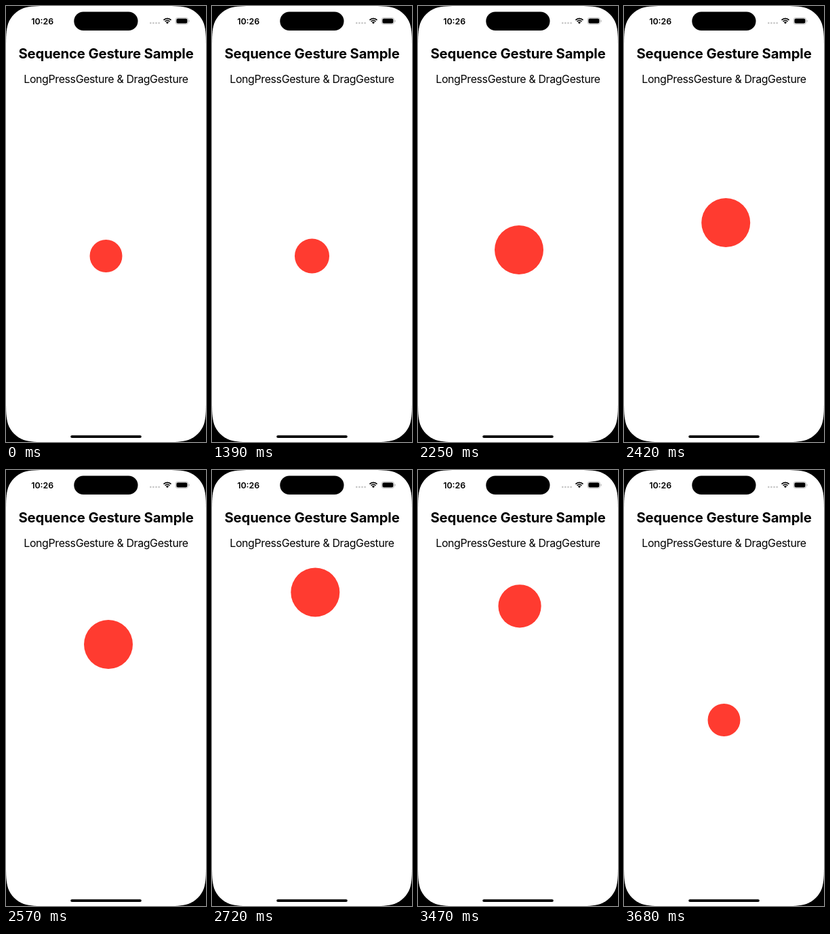
An HTML page with a canvas that plays this animation: 295x640 px, repeating every 3.7 s.

```html
<!DOCTYPE html>
<html lang="en">
<head>
<meta charset="utf-8">
<title>Sequence Gesture Sample</title>
<style>
html, body { margin: 0; width: 100%; height: 100%; overflow: hidden; background: #000; }
canvas { display: block; width: 295px; height: 640px; }
</style>
</head>
<body>
<canvas id="stage"></canvas>
<script>
const W = 295, H = 640, LOOP = 3700;
const FONT = 'Inter, Roboto, "Liberation Sans", sans-serif';
const canvas = document.getElementById('stage');
const ctx = canvas.getContext('2d');
const dpr = window.devicePixelRatio || 1;
canvas.width = W * dpr;
canvas.height = H * dpr;

const REST = { x: 147.5, y: 367, r: 24 };
const HELD_R = 36;

// Times at which the screen refreshes with a new pose
const STEPS = [0, 1390, 1470, 1540, 1610, 1680, 2250, 2340, 2410, 2490, 2570,
  2640, 2720, 2800, 2880, 2970, 3300, 3390, 3470, 3540, 3610, 3680];

// Finger path: time, x, y
const DRAG = [
  [2249, 147.5, 367], [2250, 149, 358], [2340, 149.7, 341], [2410, 150.2, 318],
  [2490, 150.6, 289], [2570, 151, 256], [2640, 151.6, 217], [2720, 152.3, 179.5],
  [2800, 152, 145], [2880, 151.7, 118], [2970, 151.5, 104]
];

const lerp = (a, b, k) => a + (b - a) * k;
const clamp = v => Math.min(1, Math.max(0, v));

// cubic-bezier(.42, 0, .58, 1)
function easeInOut(p) {
  if (p <= 0 || p >= 1) return clamp(p);
  let lo = 0, hi = 1, u = p;
  for (let i = 0; i < 24; i++) {
    u = (lo + hi) / 2;
    const x = 3 * (1 - u) * (1 - u) * u * 0.42 + 3 * (1 - u) * u * u * 0.58 + u * u * u;
    if (x < p) lo = u; else hi = u;
  }
  return u * u * (3 - 2 * u);
}

const tween = (t, start) => easeInOut((t - start) / 350);

function dragAt(t) {
  if (t <= DRAG[0][0]) return REST;
  for (let i = 1; i < DRAG.length; i++) {
    const [t0, x0, y0] = DRAG[i - 1], [t1, x1, y1] = DRAG[i];
    if (t <= t1) {
      const k = (t - t0) / (t1 - t0);
      return { x: lerp(x0, x1, k), y: lerp(y0, y1, k) };
    }
  }
  const last = DRAG[DRAG.length - 1];
  return { x: last[1], y: last[2] };
}

function pose(time) {
  let t = 0;
  for (const s of STEPS) if (s <= time) t = s;
  const grow = t < 1390 ? 0 : tween(t, 1303);
  const back = tween(t, 3323);
  const p = dragAt(t);
  return {
    x: lerp(p.x, REST.x, back),
    y: lerp(p.y, REST.y, back),
    r: lerp(REST.r, HELD_R, grow * (1 - back))
  };
}

function pill(x, y, w, h, r, color) {
  ctx.fillStyle = color;
  ctx.beginPath();
  ctx.roundRect(x, y, w, h, r);
  ctx.fill();
}

function disc(x, y, r, color) {
  ctx.fillStyle = color;
  ctx.beginPath();
  ctx.arc(x, y, r, 0, Math.PI * 2);
  ctx.fill();
}

function label(str, x, y, size, weight, spacing) {
  ctx.font = `${weight} ${size}px ${FONT}`;
  ctx.letterSpacing = spacing + 'px';
  ctx.fillStyle = '#000';
  ctx.textAlign = 'center';
  ctx.fillText(str, x, y);
}

// Screen with continuous-curvature corners
function screen() {
  const r = 41.3, a = 1.5287 * r, b = 1.0885 * r, c = 0.8684 * r;
  const d = 0.6315 * r, e = 0.0749 * r, f = 0.3728 * r, g = 0.1691 * r;
  ctx.beginPath();
  const corner = (px, py, swap) => {
    const at = (u, v) => [px ? W - u : u, py ? H - v : v];
    const pts = [[a, 0], [b, 0], [c, 0], [d, e], [f, g], [g, f], [e, d], [0, c], [0, b], [0, a]];
    if (swap) pts.reverse();
    const q = pts.map(p => at(p[0], p[1]));
    ctx.lineTo(...q[0]);
    for (let i = 1; i < 10; i += 3) ctx.bezierCurveTo(...q[i], ...q[i + 1], ...q[i + 2]);
  };
  corner(0, 0, true);
  corner(1, 0, false);
  corner(1, 1, true);
  corner(0, 1, false);
  ctx.closePath();
  ctx.fillStyle = '#fff';
  ctx.fill();
}

function wifi(x, y) {
  const a0 = -Math.PI * 0.75, a1 = -Math.PI * 0.25;
  ctx.strokeStyle = '#000';
  ctx.lineWidth = 1.7;
  for (const r of [7.8, 4.9]) {
    ctx.beginPath();
    ctx.arc(x, y, r, a0, a1);
    ctx.stroke();
  }
  ctx.fillStyle = '#000';
  ctx.beginPath();
  ctx.moveTo(x, y);
  ctx.arc(x, y, 2.9, a0, a1);
  ctx.fill();
}

function battery() {
  ctx.strokeStyle = '#a8a8a8';
  ctx.lineWidth = 0.8;
  ctx.beginPath();
  ctx.roundRect(250.2, 17.4, 18.4, 9.2, 3);
  ctx.stroke();
  pill(251.4, 18.6, 16, 6.8, 2, '#000');
  pill(269.6, 20.5, 1, 3, 0.5, '#a8a8a8');
}

function draw(time) {
  ctx.setTransform(dpr, 0, 0, dpr, 0, 0);
  ctx.fillStyle = '#000';
  ctx.fillRect(0, 0, W, H);
  screen();
  pill(100.3, 8.4, 94.2, 27.7, 13.85, '#000');
  label('10:26', 53.7, 26.5, 12.4, 600, 0);
  for (let i = 0; i < 4; i++) disc(213.3 + i * 4.1, 25, 1.25, '#c2c2c2');
  wifi(238, 26.2);
  battery();
  label('Sequence Gesture Sample', 147.5, 76.5, 20.3, 700, -0.15);
  label('LongPressGesture & DragGesture', 147.5, 112.5, 15.9, 400, -0.35);
  const c = pose(time);
  disc(c.x, c.y, c.r, '#ff3b30');
  pill(95.2, 630.2, 104.6, 3.8, 1.9, '#000');
}

const start = performance.now();
function frame() {
  draw((performance.now() - start) % LOOP);
  requestAnimationFrame(frame);
}
frame();
</script>
</body>
</html>
```
